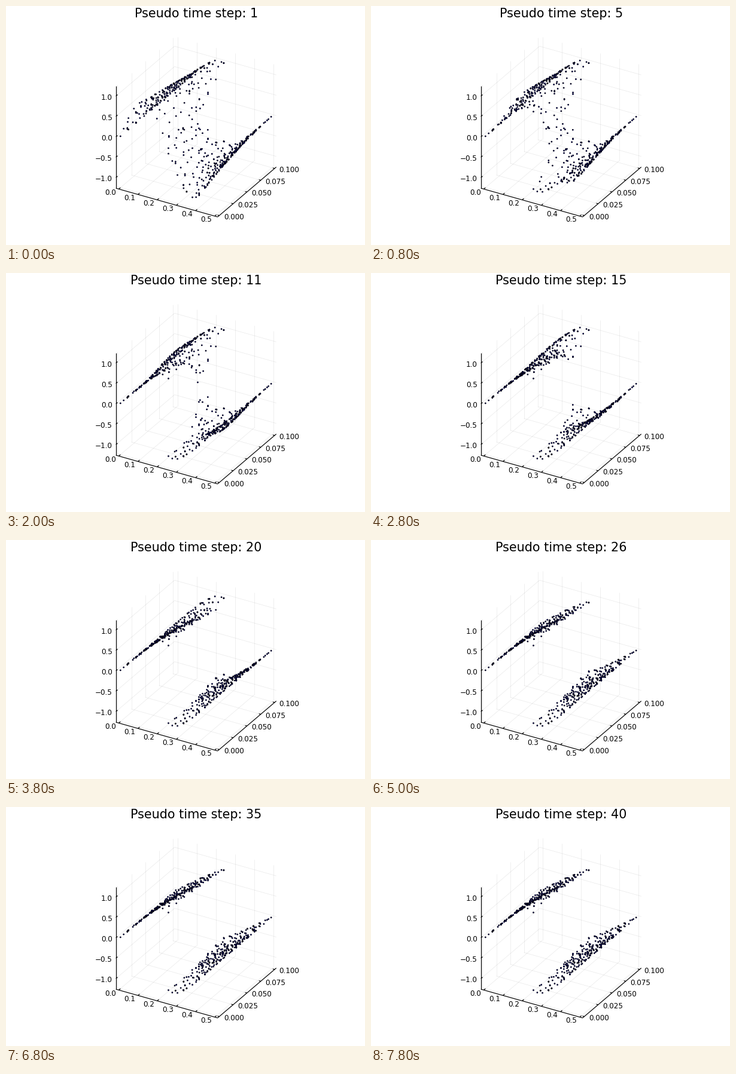
A matplotlib script for the animation above (8000 ms loop, 600 px wide and 400 px high).

```python
import numpy as np
import matplotlib.pyplot as plt
from matplotlib.animation import FuncAnimation

W, H, DPI = 600, 400, 100
PX = 72 / DPI
STEPS, INTERVAL = 40, 200
XLIM, YLIM, ZLIM = (-0.015, 0.515), (-0.003, 0.103), (-1.261, 1.246)
ORIGIN = np.array([183.7, 305.0])
EX, EY, EZ = np.array([170, 48]), np.array([98, -83.5]), np.array([0, -171])
K = 4 * np.pi
SHOCK = 0.25


def project(x, y, z):
    """Oblique view: data coordinates to stage pixels."""
    parts = []
    for v, (lo, hi), e in ((x, XLIM, EX), (y, YLIM, EY), (z, ZLIM, EZ)):
        parts.append(((np.asarray(v, float) - lo) / (hi - lo))[..., None] * e)
    return ORIGIN + sum(parts)


def burgers(x, t):
    """Burgers flow from sin(4 pi x), traced back along characteristics."""
    side = np.where(x <= SHOCK, 1.0, -1.0)
    x = np.where(x <= SHOCK, x, 0.5 - x)
    lo = np.zeros_like(x)
    hi = np.arccos(-1 / np.maximum(K * t, 1.0)) / K
    for _ in range(40):
        mid = (lo + hi) / 2
        low = mid + t * np.sin(K * mid) < x
        lo, hi = np.where(low, mid, lo), np.where(low, hi, mid)
    return side * np.sin(K * lo)


def make_nodes(rng):
    """Mesh nodes: coarse edges, both faces of the shock line, finer inside."""
    bottom = np.r_[0, 0.0167, 0.0417, np.arange(0.07, 0.24, 0.03),
                   0.27, 0.297, 0.329, 0.375, 0.394, 0.41, 0.44, 0.47, 0.5]
    top = np.r_[np.arange(0, 0.25, 0.034), np.arange(0.28, 0.51, 0.031)]
    rows = np.linspace(0, 0.1, 8)
    xs, ys = [bottom, top], [np.zeros(len(bottom)), np.full(len(top), 0.1)]
    for edge in (0, 0.5, SHOCK - 1e-5, SHOCK + 1e-5):
        inner = rows[1:-1] if edge in (0, 0.5) else rows
        xs.append(np.full(len(inner), edge))
        ys.append(inner)
    gx, gv = np.meshgrid((np.arange(31) + 0.5) / 62, (np.arange(13) + 0.5) / 13)
    gx = gx + rng.uniform(-0.0078, 0.0078, gx.shape)
    gv = gv + rng.uniform(-0.036, 0.036, gv.shape)
    # rows crowd together a little above the middle
    gy = 0.1 * (gv + 0.5 * np.sin(2 * np.pi * gv) / (2 * np.pi)) ** 0.85
    xs.append(gx.ravel())
    ys.append(gy.ravel())
    return np.concatenate(xs), np.concatenate(ys)


rng = np.random.default_rng(7)
px, py = make_nodes(rng)
twin = rng.random(len(px)) < 0.15
px, py = np.r_[px, px[twin]], np.r_[py, py[twin]]

# neighbouring elements disagree a little about the value at a node
spread = np.zeros(len(px))
spread[-twin.sum():] = rng.uniform(-0.005, 0.005, twin.sum())
on_shock = abs(px - SHOCK) < 1e-4
spread[on_shock] = (np.sign(px - SHOCK) * rng.uniform(0.001, 0.01, len(px)))[on_shock]
sx = np.where(px <= SHOCK, np.clip(px + spread, 0, SHOCK),
              np.clip(px + spread, SHOCK + 1e-6, 0.5))
sx = np.where((px == 0) | (px == 0.5), px, sx)
before, after = burgers(sx, py), burgers(sx, py + 0.1)


def surface(k):
    """Values after k pseudo steps: a front sweeps along the time axis."""
    if k == 0:
        return before
    w = 0.5 + 0.5 * np.tanh(0.8 * (0.0047 * k - py) / (0.0025 * np.sqrt(k)))
    return (1 - w) * before + w * after


fig = plt.figure(figsize=(W / DPI, H / DPI), dpi=DPI, facecolor="white")
ax = fig.add_axes([0, 0, 1, 1])
ax.set_xlim(0, W)
ax.set_ylim(H, 0)
ax.axis("off")


def line(a, b, width=1.2, alpha=1.0):
    ax.plot(*np.transpose([a, b]), color="black", lw=width * PX, alpha=alpha,
            solid_capstyle="butt", zorder=1)


def grid(*ends):
    line(project(*ends[0]), project(*ends[1]), 0.8, 0.08)


def label(pos, text, ha):
    ax.text(*pos, text, fontsize=12 * PX, family="DejaVu Sans", ha=ha,
            va="center_baseline")


x0, x1 = XLIM
y0, y1 = YLIM
z0, z1 = ZLIM
tick_y, tick_x = EY * 0.028, -EX * 0.018

for v in np.arange(6) / 10:
    grid((v, y0, z0), (v, y1, z0))
    grid((v, y1, z0), (v, y1, z1))
    p = project(v, y0, z0)
    line(p, p + tick_y)
    label(p + (-4.6, 4.5), f"{v:.1f}", "right")
for v in np.arange(5) / 40:
    grid((x0, v, z0), (x1, v, z0))
    grid((x0, v, z0), (x0, v, z1))
    p = project(x1, v, z0)
    line(p, p + tick_x)
    label(p + (7.6, 1.2), f"{v:.3f}", "left")
for v in np.arange(-2, 3) / 2:
    grid((x0, y0, v), (x0, y1, v))
    grid((x0, y1, v), (x1, y1, v))
    p = project(x0, y0, v)
    line(p, p + tick_y)
    label(p + (-6, 0.8), f"{v:.1f}".replace("-", "\u2212"), "right")

corner = project(x0, y0, z0)
line(corner, project(x1, y0, z0))
line(project(x1, y0, z0), project(x1, y1, z0))
line(corner, project(x0, y0, z1))

title = ax.text(318, 18.7, "", fontsize=20.8 * PX, family="DejaVu Sans",
                ha="center", va="baseline")
dots = ax.scatter(px, py, s=(1.85 * PX) ** 2, facecolors=["#0000ff"] * len(px),
                  edgecolors="black", linewidths=0.9 * PX, zorder=3)


def update(k):
    title.set_text(f"Pseudo time step: {k + 1}")
    dots.set_offsets(project(px, py, surface(k)))
    return title, dots


anim = FuncAnimation(fig, update, frames=STEPS, interval=INTERVAL,
                     repeat=True, repeat_delay=0)
plt.show()
```
